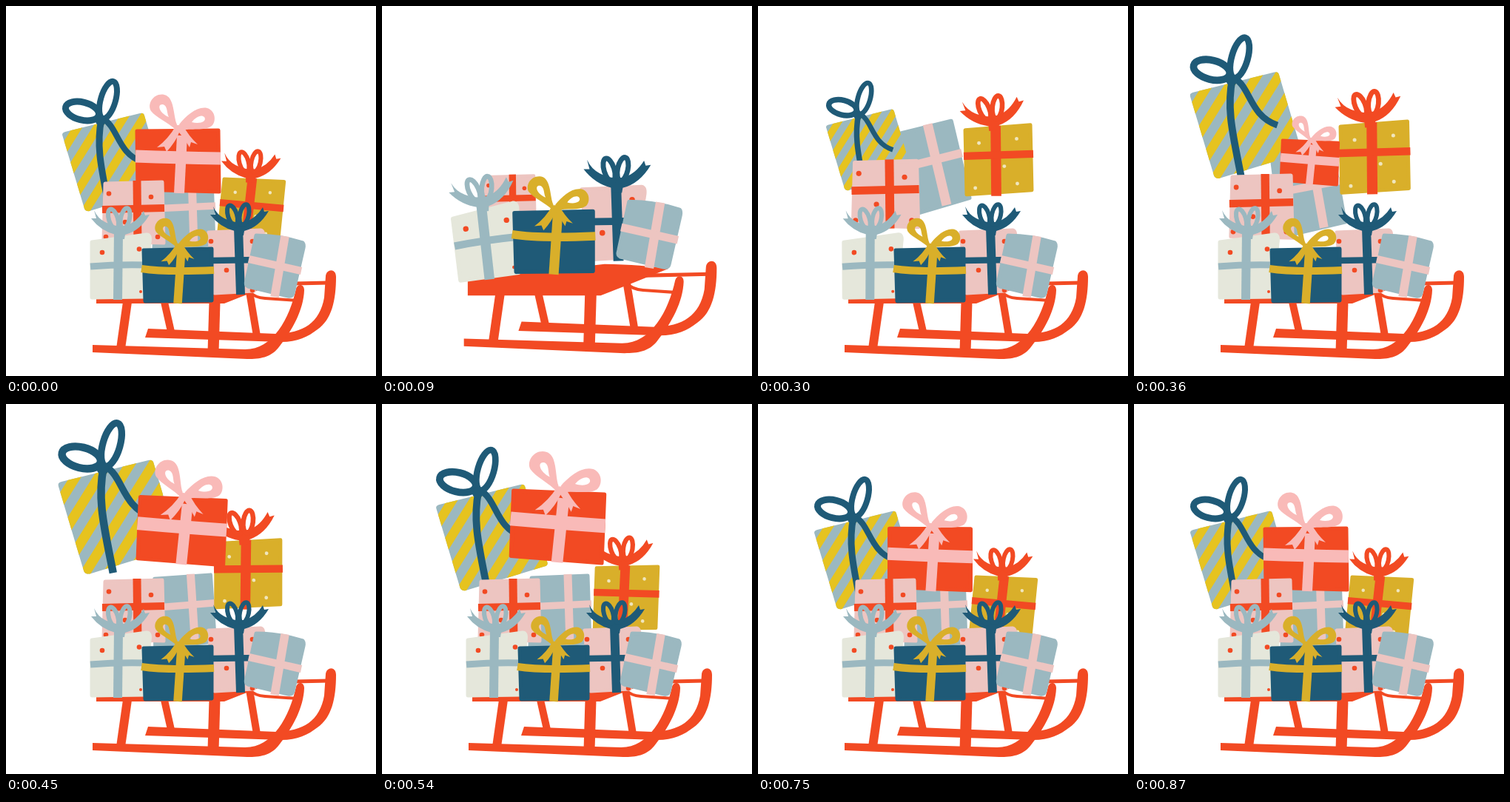
An HTML page that plays this animation: 500x500 px, repeating every 900 ms.

```html
<!DOCTYPE html>
<html lang="en">
<head>
<meta charset="utf-8">
<title>Sled with presents</title>
<style>
html, body { margin: 0; width: 100%; height: 100%; overflow: hidden; background: #fff; }
svg { display: block; width: 100vw; height: 100vh; }
</style>
</head>
<body>
<svg id="stage" viewBox="0 0 500 500"></svg>
<script>
const RED = '#f24a23', NAVY = '#1f5a77', GOLD = '#d9af2a', BLUE = '#9bb8c0',
  PINK = '#edc5c1', ROSE = '#f9bab8', CREAM = '#e5e7db', YELLOW = '#e6c31f';
const LOOP = 900, STEP = 30;

const fill = (d, c) => `<path d="${d}" fill="${c}" fill-rule="evenodd"/>`;
const line = (d, c, w) =>
  `<path d="${d}" fill="none" stroke="${c}" stroke-width="${w}" stroke-linejoin="round"/>`;
const box = (d, c) =>
  `<path d="${d}Z" fill="${c}" stroke="${c}" stroke-width="5" stroke-linejoin="round"/>`;
const dot = (x, y, c, r = 3.3) => `<circle cx="${x}" cy="${y}" r="${r}" fill="${c}"/>`;
const ring = (x, y, rx, ry, rot, c, w) =>
  `<ellipse cx="${x}" cy="${y}" rx="${rx}" ry="${ry}" transform="rotate(${rot} ${x} ${y})" fill="none" stroke="${c}" stroke-width="${w}"/>`;
const put = (x, y, s, rot, art) =>
  `<g transform="translate(${x} ${y}) rotate(${rot}) scale(${s})">${art}</g>`;

// Bow with two upright loops and spread tails, base at 0,0
const fanBow = c =>
  fill('M-35-33Q-30-22-20-17Q-12-13-5-12L7-12Q22-16 32-32L34-26L40-27Q27-5 7 0L6 6L-6 6L-6 0Q-26-5-39-22L-32-22Z', c) +
  ring(-9, -21, 6, 14, -17, c, 6) + ring(7, -22, 6, 14, 12, c, 6);

// Bow with two wide loops and hanging tails, knot at 0,0
const loopBow = c =>
  fill('M-3-5C-8-16-6-42-20-45C-34-48-44-33-38-23C-31-14-15-8-4 3ZM-14-15C-17-20-15-30-22-32C-30-33-28-21-14-15Z', c) +
  fill('M0-5C10-17 24-30 38-27C50-23 50-8 44-3C34 4 16 0 2 3ZM17-8C22-15 30-19 34-15C38-9 28-5 17-8Z', c) +
  fill('M-4-4Q-14 14-30 26L-20 25L-17 32Q-5 19 0 6Q8 15 14 26L16 19L25 22Q13 11 5-4Z', c);

const stripes = Array.from({ length: 9 }, (_, i) =>
  line(`M${94 + i * 27} 125l-100 160`, YELLOW, 11.5)).join('');

const sled = {
  at: [281.5, 417],
  art:
    line('M214 400L223 440', RED, 10) + line('M329 386L339 446', RED, 10) +
    fill('M192 436L365 443C402 442 424 428 430 394L432 365C433 355 446 354 446 366C446 398 440 424 421 437C408 447 394 454 372 454L188 448Z', RED) +
    line('M345 376L436 374', RED, 5) + line('M329 386Q336 394 350 395L394 398', RED, 4) +
    fill('M122 381L300 361Q350 362 383 367L338 385L295 402L122 402Z', RED) +
    line('M164 400L155 463', RED, 12) + line('M282 400L280 468', RED, 15) +
    fill('M117 458L322 464C360 465 383 423 392 382C394 375 403 375 403 384C402 410 388 437 368 462C357 475 344 477 326 477L117 468Z', RED)
};

// Presents from back to front. Each one pops up at start, is highest and
// largest at peak, and settles at land; lift, size, shift and tilt are its peak pose.
const presents = [
  { at: [243, 278], start: 110, peak: 270, land: 430, lift: 67, size: 1.2, shift: -13, tilt: -12,
    art: box('M202 235L278 232L281 322L200 329', BLUE) +
      line('M251 230L254 325', PINK, 11) + line('M198 274L283 270', PINK, 9.5) },

  { at: [140, 205], start: 265, peak: 420, land: 660, lift: 62, size: 1.17, shift: 5, tilt: 0,
    art: '<clipPath id="wrap"><path d="M76 174Q76 171 80 170L181 145Q186 144 187 148L215 243Q215 246 211 247L113 277Q108 278 106 274Z"/></clipPath>' +
      `<g clip-path="url(#wrap)"><rect x="60" y="130" width="170" height="160" fill="${BLUE}"/>${stripes}</g>` +
      line('M129 153C121 190 130 225 140 276', NAVY, 9) +
      line('M131 152C152 164 150 199 185 211', NAVY, 8) +
      ring(103, 142, 23, 12, 14, NAVY, 9) + ring(138, 127, 10, 26, 16, NAVY, 8) +
      dot(128, 155, NAVY, 7) },

  { at: [331, 278], start: 210, peak: 330, land: 620, lift: 73, size: 1.12, shift: -6, tilt: -7,
    art: put(331, 278, .9, 7,
      box('M-46-44L44-51L46 39L-44 45', GOLD) +
      [[-27, -26], [25, -32], [8, 6], [26, 30], [-32, 36]].map(p => dot(...p, '#f0e6bd', 2.5)).join('') +
      line('M-4-50L-3 47', RED, 14) + line('M-48-8L48-11', RED, 10.5) +
      put(-7, -50, 1.13, -6, fanBow(RED))) },

  { at: [232, 210], start: 345, peak: 510, land: 750, lift: 46, size: 1.12, shift: 5, tilt: 3,
    art: box('M177 169L287 168L288 251L178 248', RED) +
      line('M238 175L234 253', ROSE, 14) + line('M175 203Q230 205 290 206', ROSE, 17) +
      put(234, 165, 1, 0, loopBow(ROSE)) },

  { at: [172, 279], start: 60, peak: 180, land: 420, lift: 50, size: 1.17, shift: 0, tilt: 0,
    art: box('M134 240L211 238L213 320L132 318', PINK) +
      [[139, 253.5], [196, 258], [161, 292], [135, 312], [205, 312]].map(p => dot(...p, RED)).join('') +
      line('M177 236L178 322', RED, 11) + line('M130 275L214 273', RED, 10) },

  { at: [313, 346], start: 0, peak: 90, land: 290, lift: 52, size: 1.15, shift: 2, tilt: 0,
    art: box('M274 306L344 303Q349 304 347 314L335 385L282 388', PINK) +
      [[277, 318], [333, 318], [298, 357], [333, 384]].map(p => dot(...p, RED)).join('') +
      line('M314 300L317 390', NAVY, 12) + line('M277 344L340 343', NAVY, 8.5) +
      put(315, 304, 1, 0, fanBow(NAVY)) },

  { at: [152, 350], start: 0, peak: 85, land: 250, lift: 33, size: 1.12, shift: -12, tilt: -7,
    art: box('M116 319L190 309Q196 309 194 320L187 393L116 394', CREAM) +
      dot(130, 333, RED) + dot(180, 328.5, RED) + dot(182, 386, RED, 2) +
      line('M152 305L151 397', BLUE, 12) + line('M114 352Q150 349 190 350', BLUE, 9) +
      put(154, 309, 1, 0, fanBow(BLUE)) },

  { at: [232, 364], start: 0, peak: 90, land: 260, lift: 45, size: 1.15, shift: 0, tilt: 0,
    art: box('M186 330L278 328L278 398L188 399', NAVY) +
      line('M237 328L232 402', GOLD, 11.5) + line('M183 355Q215 360 281 357', GOLD, 10) +
      put(234, 324, .82, 0, loopBow(GOLD)) },

  { at: [363, 351], start: 0, peak: 130, land: 290, lift: 48, size: 1.13, shift: -2, tilt: 0,
    art: box('M338 310Q370 310 401 320Q403 322 402 327L388 388Q387 393 381 392L327 379Q323 377 325 371Z', BLUE) +
      line('M377 311L363 393', PINK, 11.5) + line('M328 342L399 358', PINK, 10) }
];

const stage = document.getElementById('stage');
const parts = [sled, ...presents];
stage.innerHTML = parts.map(p => `<g>${p.art}</g>`).join('');
parts.forEach((p, i) => p.el = stage.children[i]);

const clamp = v => Math.min(1, Math.max(0, v));
const fall = v => 1 - clamp(v) ** 2 * (3 - 2 * clamp(v));

function place({ el, at: [x, y] }, dx, dy, s, turn) {
  el.setAttribute('transform',
    `translate(${x + dx} ${y + dy}) rotate(${turn}) scale(${s}) translate(${-x} ${-y})`);
}

function hop(p, t) {
  p.el.style.display = t > p.start ? '' : 'none';
  const rise = 1 - (1 - clamp((t - p.start) / (p.peak - p.start))) ** 2;
  const drop = (t - p.peak) / (p.land - p.peak);
  const high = rise < 1 ? 1.25 * rise - .25 : fall(drop);
  const size = rise < 1 ? .6 + (p.size - .6) * rise : 1 + (p.size - 1) * fall(drop);
  place(p, p.shift * fall(drop), -p.lift * high, size, p.tilt * fall(drop / 1.5));
}

function draw(ms) {
  const t = Math.floor(ms % LOOP / STEP) * STEP || LOOP;
  const kick = (1 - clamp(t / 220)) ** 2;
  place(sled, 0, -29 * kick, 1 + .11 * kick, 0);
  for (const p of presents) hop(p, t);
}

let start;
function tick(now) {
  start ??= now;
  draw(Math.max(0, now - start));
  requestAnimationFrame(tick);
}
draw(0);
requestAnimationFrame(tick);
</script>
</body>
</html>
```
